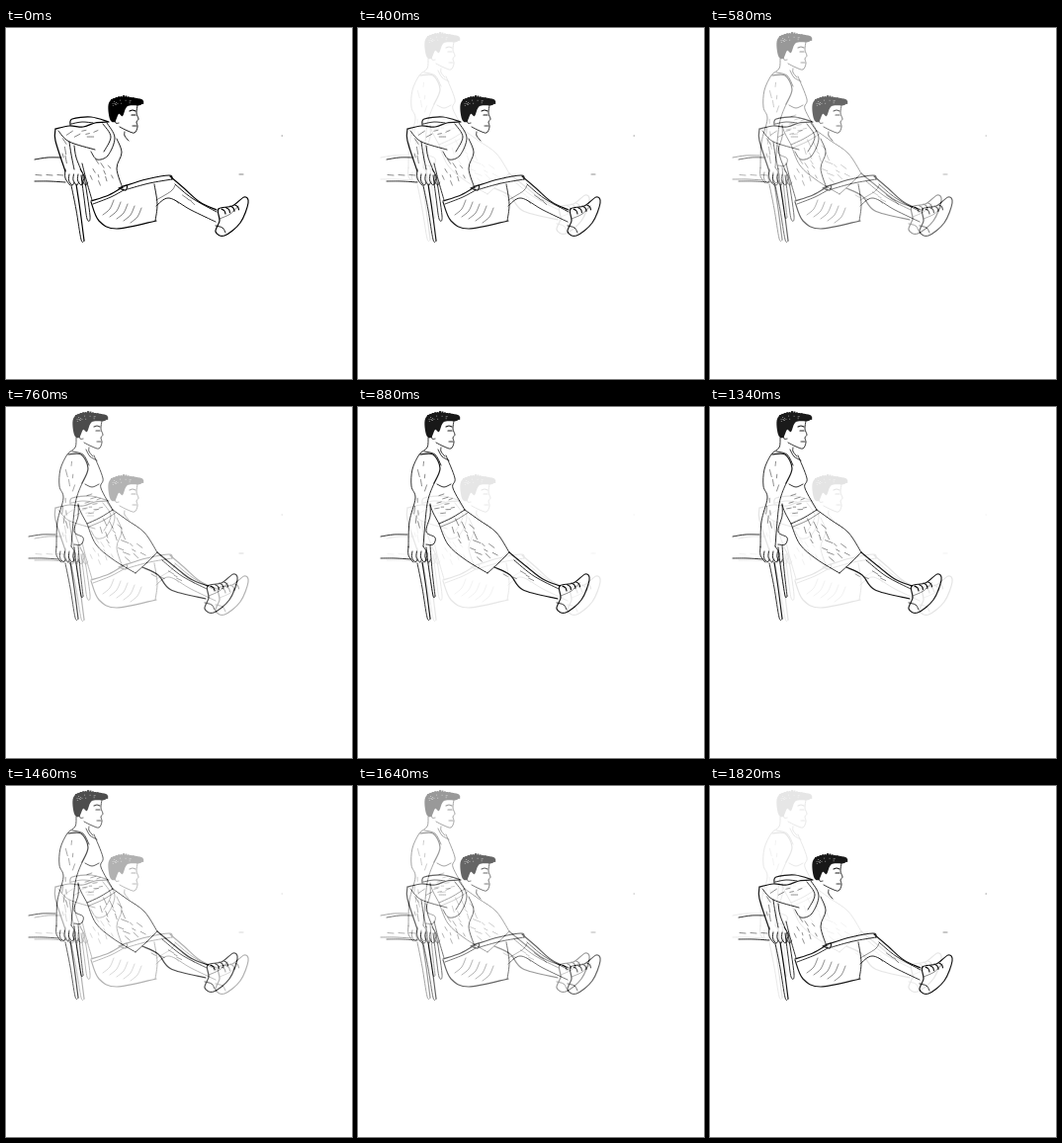
Recreate the animation shown at these times as an HTML page with a canvas. Size 350x355 px, loop 1880 ms.

```html
<!DOCTYPE html>
<html lang="en">
<head>
<meta charset="utf-8">
<title>Bench dip</title>
<style>
html, body { margin: 0; width: 100%; height: 100%; overflow: hidden; background: #fff; }
canvas { display: block; width: 350px; height: 355px; }
</style>
</head>
<body>
<canvas id="stage" width="350" height="355"></canvas>
<script>
const W = 350, H = 355;
const HOLD = 400, STEP = 60, STEPS = 9;
const HALF = HOLD + STEP * STEPS;
const THIN = .5, MID = .9, BOLD = 1.2;

let g, rnd;

function random(seed) {
  return () => (seed = seed * 16807 % 2147483647) / 2147483647;
}

// Smooth path through x, y pairs.
function curve(xy, closed) {
  const count = xy.length / 2, path = new Path2D();
  const at = i => {
    const j = closed ? (i + count) % count : Math.max(0, Math.min(count - 1, i));
    return [xy[2 * j], xy[2 * j + 1]];
  };
  path.moveTo(...at(0));
  for (let i = 0; i < (closed ? count : count - 1); i++) {
    const [a, b, c, d] = [at(i - 1), at(i), at(i + 1), at(i + 2)];
    path.bezierCurveTo(
      b[0] + (c[0] - a[0]) / 6, b[1] + (c[1] - a[1]) / 6,
      c[0] - (d[0] - b[0]) / 6, c[1] - (d[1] - b[1]) / 6, ...c);
  }
  return path;
}

function pen(width, ...xy) {
  g.lineWidth = width;
  g.stroke(curve(xy));
}

function shifted(dx, dy, part) {
  g.save();
  g.translate(dx, dy);
  part();
  g.restore();
}

// Short shading strokes scattered in an ellipse, all leaning about the same way.
function shade(cx, cy, rx, ry, lean, count, size) {
  for (let i = 0; i < count; i++) {
    const t = i * 2.4, r = Math.sqrt((i + .5) / count);
    const x = cx + rx * r * Math.cos(t), y = cy + ry * r * Math.sin(t);
    const a = lean + (rnd() - .5) * .6, s = size * (.3 + rnd() * .4);
    pen(THIN, x - s * Math.cos(a), y - s * Math.sin(a), x + s * Math.cos(a), y + s * Math.sin(a));
  }
}

function hair() {
  g.fill(curve([69, 28, 68, 12, 78, 6, 101, 8, 100, 14, 87, 15, 82, 25, 78, 23, 74, 31], true));
  // ragged tufts along the top
  for (let i = 0; i < 14; i++) {
    const x = 70 + i * 2.4, y = 8 - 3 * Math.sin(i * .32);
    g.fillRect(x, y - rnd(), 2, 3);
  }
  g.fillStyle = '#ccc';
  for (let i = 0; i < 14; i++) g.fillRect(71 + rnd() * 26, 8 + rnd() * 6, 1, .6);
  g.fillStyle = '#000';
}

function head() {
  hair();
  pen(MID, 97, 14, 96, 22, 98, 28, 96, 31, 97, 36, 94, 42, 87, 40, 79, 36);
  pen(MID, 76, 24, 74, 26, 75, 32, 78, 32);
  pen(BOLD, 89, 20, 92, 19, 95, 20);
  pen(BOLD, 91, 24, 95, 24);
  pen(MID, 92, 35, 96, 35);
  pen(MID, 84, 41, 84, 45, 88, 50);
}

function shoe() {
  g.lineWidth = BOLD;
  g.stroke(curve([204, 181, 218, 178, 230, 169, 234, 175, 226, 195, 210, 208, 201, 204, 205, 193], true));
  pen(MID, 201, 198, 208, 200, 211, 205);
  pen(THIN, 205, 191, 216, 186, 224, 178);
  for (let i = 0; i < 4; i++) {
    const x = 207 + i * 4.5, y = 181 - i * 1.4;
    pen(BOLD, x, y, x + 3, y + 2, x + 4, y + 5);
  }
}

function hand() {
  pen(MID, 51, 141, 51, 150, 56, 157);
  pen(MID, 66, 141, 70, 148, 68, 156);
  for (let x = 55; x < 69; x += 4.5) pen(MID, x, 146, x - .5, 152, x + 3, 157, x + 5, 154);
}

function bench() {
  pen(MID, 23, 131, 36, 129, 50, 129);
  pen(MID, 23, 153, 38, 153, 54, 154);
}

function chairLeg() {
  pen(MID, 60, 158, 65, 183, 70, 213, 73, 214);
  pen(BOLD, 65, 157, 69, 183, 73, 214);
}

function lowered() {
  shifted(6, 2, bench);
  for (let x = 30; x < 60; x += 11) pen(THIN, x, 148.5, x + 6, 149);
  shifted(6, 1, chairLeg);
  pen(MID, 76, 149, 79, 172, 82, 193, 85, 190, 79, 149);
  shifted(36, 64, head);

  // arms
  pen(BOLD, 65, 98, 67, 92, 86, 90, 104, 95);
  pen(MID, 66, 97, 77, 95, 88, 96);
  pen(BOLD, 50, 102, 64, 99, 78, 100, 90, 96, 103, 95);
  pen(BOLD, 50, 102, 50, 114, 60, 145);
  pen(MID, 53, 104, 64, 115, 90, 123);
  pen(MID, 64, 115, 66, 128, 69, 143);
  pen(MID, 69, 119, 71, 131, 77, 146);
  shade(78, 107, 16, 5, -.3, 6, 6);
  shade(59, 124, 3, 12, 1.3, 4, 6);
  shifted(9, 2, hand);

  // vest
  pen(MID, 102, 96, 110, 111, 103, 129, 92, 133, 86, 125);
  pen(MID, 98, 97, 106, 110, 99, 125);
  pen(MID, 112, 112, 117, 126, 112, 142, 118, 162);
  pen(MID, 77, 137, 81, 153, 87, 174);
  shade(97, 146, 12, 14, 1, 10, 4);

  // shorts
  pen(BOLD, 86, 175, 104, 169, 118, 161);
  pen(MID, 88, 178, 106, 171, 119, 164);
  pen(BOLD, 114, 162, 122, 159, 121, 164, 114, 162);
  pen(BOLD, 119, 160, 142, 153, 165, 149, 168, 153);
  pen(MID, 123, 163, 145, 157, 168, 153);
  pen(BOLD, 86, 176, 94, 195, 112, 203, 152, 195);
  pen(MID, 150, 158, 153, 178, 151, 195);
  for (let i = 0; i < 5; i++) {
    const x = 109 + i * 7, y = 174 + i * 2;
    pen(THIN, x, y, x - 4, y + 9, x - 11, y + 15);
  }

  // legs
  pen(BOLD, 166, 150, 180, 162, 196, 176, 213, 184);
  pen(MID, 171, 158, 188, 172, 213, 186);
  pen(MID, 152, 180, 165, 172, 187, 184, 212, 196);
  pen(THIN, 152, 174, 167, 165, 171, 159);
  shade(180, 174, 16, 4, .5, 4, 5);
  shifted(11, 2, shoe);

  // specks on the paper
  pen(THIN, 236, 148, 240, 148);
  pen(THIN, 279, 109, 279.5, 109);
}

function raised() {
  bench();
  chairLeg();
  pen(MID, 69, 142, 72, 166, 76, 191, 78, 191);
  pen(MID, 73, 140, 75, 165, 78, 191);
  head();

  // arms
  pen(MID, 71, 31, 70, 41, 62, 48, 55, 63, 54, 80, 58, 92, 52, 116, 51, 142);
  pen(MID, 77, 77, 70, 98, 66, 141);
  pen(MID, 73, 98, 73, 110, 69, 126, 78, 132, 76, 139, 69, 139);
  shade(66, 70, 5, 18, 1.6, 5, 6);
  shade(60, 107, 3, 18, 1.6, 5, 6);
  hand();

  // vest
  pen(BOLD, 63, 48, 76, 48, 83, 62, 77, 77);
  pen(MID, 67, 45, 78, 48, 84, 59);
  pen(MID, 81, 43, 85, 50, 92, 54);
  pen(MID, 89, 49, 98, 72, 96, 82, 108, 104);
  pen(MID, 80, 78, 87, 81, 94, 78);
  pen(MID, 73, 99, 76, 107, 82, 118);
  shade(88, 98, 9, 12, -.3, 10, 4);

  // shorts
  pen(MID, 82, 118, 95, 112, 108, 104);
  pen(THIN, 84, 121, 98, 115, 111, 107);
  pen(MID, 108, 104, 122, 114, 140, 127, 153, 147);
  pen(MID, 82, 118, 91, 139, 108, 154, 131, 168);
  pen(MID, 131, 168, 143, 157, 153, 147);
  shade(106, 126, 14, 12, 1, 9, 6);
  shade(126, 145, 14, 11, .6, 9, 6);

  // legs
  pen(BOLD, 153, 147, 170, 161, 187, 174, 204, 181);
  pen(MID, 158, 155, 178, 171, 203, 184);
  pen(BOLD, 138, 162, 154, 170, 167, 185, 202, 194);
  shade(166, 171, 18, 5, .7, 5, 5);
  shoe();
}

function render(pose) {
  const layer = document.createElement('canvas');
  layer.width = W;
  layer.height = H;
  g = layer.getContext('2d');
  rnd = random(77);
  g.fillStyle = '#fff';
  g.fillRect(0, 0, W, H);
  g.fillStyle = g.strokeStyle = '#000';
  g.lineCap = g.lineJoin = 'round';
  pose();
  return layer;
}

const low = render(lowered), high = render(raised);
const ctx = document.getElementById('stage').getContext('2d');

function mix(time) {
  const local = time % HALF;
  const k = local < HOLD ? 0 : Math.floor((local - HOLD) / STEP) + 1;
  return k / (STEPS + 1);
}

function draw(now) {
  const time = now % (2 * HALF);
  const [from, to] = time < HALF ? [low, high] : [high, low];
  ctx.globalAlpha = 1;
  ctx.drawImage(from, 0, 0);
  ctx.globalAlpha = mix(time);
  ctx.drawImage(to, 0, 0);
}

const start = performance.now();
function loop() {
  draw(performance.now() - start);
  requestAnimationFrame(loop);
}
loop();
</script>
</body>
</html>
```
